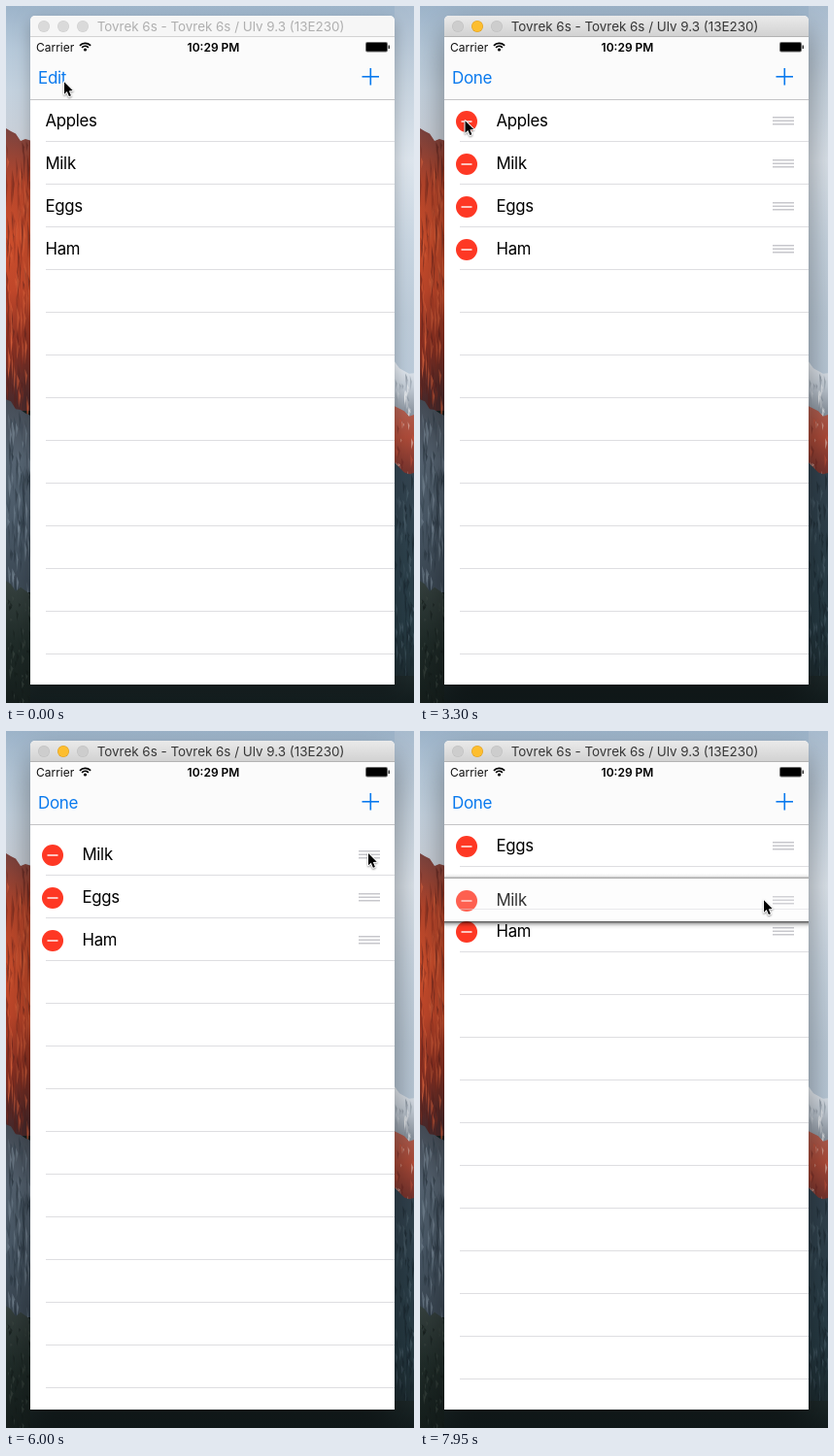
Write an HTML page with a canvas that moves like this. It is 420 by 718 pixels and loops after 8 s.

```html
<!DOCTYPE html>
<html lang="en">
<head>
<meta charset="utf-8">
<title>Editable list</title>
<style>
html, body { margin: 0; width: 100%; height: 100%; overflow: hidden; background: #16211f; }
canvas { display: block; width: 420px; height: 718px; }
</style>
</head>
<body>
<canvas id="stage" width="420" height="718"></canvas>
<script>
const LOOP = 8000, TICK = 150;
const W = 420, H = 718;
const LEFT = 25, RIGHT = 400, TOP = 10, BOTTOM = 699, WIDE = RIGHT - LEFT;
const LIST = 96, ROW = 44, DELETE = 82;
const FONT = 'Inter, "Liberation Sans", sans-serif';
const BLUE = '#0a7aee', RED = '#fe3824', LINE = '#dedee1', GRIP = '#c7c7cc';
const ctx = document.getElementById('stage').getContext('2d');

// Progress of a move whose first visible step falls on `from` and last on `to`.
function linear(t, from, to) {
  return Math.min(1, Math.max(0, (t - from + TICK) / (to - from + TICK)));
}

function ease(t, from, to) {
  const p = linear(t, from, to);
  return p * p * (3 - 2 * p);
}

// Pointer moves: from, to, x, y
const MOVES = [
  [300, 600, 48, 78.5],
  [1200, 1350, 124, 120],
  [1950, 1950, 66.5, 120.5],
  [2100, 2100, 47, 118],
  [2400, 2700, 112, 118],
  [2850, 3300, 46, 117.5],
  [3900, 4500, 361.5, 118.5],
  [4950, 5700, 368.5, 117.5],
  [5850, 6000, 372.5, 117.5],
  [7350, 7950, 353.5, 117.5]
];

function poseAt(t) {
  const pose = {
    active: t >= 1050,
    edit: ease(t, 1200, 1350),
    swipe: DELETE * ease(t, 3600, 3900),
    gone: ease(t, 4650, 4950),
    scroll: Math.round(9 * (ease(t, 5850, 6000) - ease(t, 6300, 7050))),
    drag: 56 * linear(t, 7350, 7950),
    swap: ease(t, 7500, 7800),
    x: 59.5, y: 77.5
  };
  for (const [from, to, x, y] of MOVES) {
    const p = ease(t, from, to);
    pose.x += (x - pose.x) * p;
    pose.y += (y - pose.y) * p;
  }
  pose.y += pose.scroll * 0.85 + pose.drag;
  return pose;
}

function rect(x, y, w, h, fill) {
  ctx.fillStyle = fill;
  ctx.fillRect(x, y, w, h);
}

function disc(x, y, r, fill) {
  ctx.fillStyle = fill;
  ctx.beginPath();
  ctx.arc(x, y, r, 0, Math.PI * 2);
  ctx.fill();
}

function round(x, y, w, h, radii, fill) {
  ctx.beginPath();
  ctx.roundRect(x, y, w, h, radii);
  ctx.fillStyle = fill;
  ctx.fill();
}

function poly(points, fill) {
  ctx.beginPath();
  points.forEach(([x, y]) => ctx.lineTo(x, y));
  ctx.closePath();
  ctx.fillStyle = fill;
  ctx.fill();
}

function label(text, x, y, size, color, opt = {}) {
  ctx.font = `${opt.weight || 400} ${size}px ${FONT}`;
  ctx.letterSpacing = (opt.track || 0) + 'px';
  ctx.textAlign = opt.align || 'left';
  ctx.fillStyle = color;
  ctx.fillText(text, x, y);
}

function fade(y0, y1, ...stops) {
  const g = ctx.createLinearGradient(0, y0, 0, y1);
  stops.forEach((c, i) => g.addColorStop(i / (stops.length - 1), c));
  return g;
}

function random(seed) {
  return () => (seed = (seed * 16807) % 2147483647) / 2147483647;
}

// A strip of landscape with a ragged top and seeded vertical flecks.
function layer(x, y0, y1, colors, flecks, length) {
  const rnd = random(y0 * 7 + x + 1);
  const ridge = [[x + 25, y1 + 12], [x, y1 + 12]];
  for (let i = 0; i <= 25; i += 5) ridge.push([x + i, y0 + i * 0.4 + rnd() * 7]);
  poly(ridge, fade(y0, y1, ...colors));
  ctx.globalAlpha = 0.5;
  for (let i = 0; i < (y1 - y0) * 0.5; i++) {
    const fx = x + rnd() * 25, fy = y0 + 12 + rnd() * (y1 - y0 - 8), len = length * (0.3 + rnd());
    poly([[fx, fy], [fx + 1 + rnd() * 2, fy + len * 0.4], [fx + rnd(), fy + len]], flecks[i % flecks.length]);
  }
  ctx.globalAlpha = 1;
}

function drawBackdrop() {
  rect(0, 0, W, H, '#16211f');
  rect(0, 0, 400, 140, fade(0, 130, '#9db4ca', '#b5c8d9', '#c3d1de', '#c9d0d9'));
  rect(400, 0, 20, 400, fade(0, 400, '#a9bccf', '#c6d3df', '#dde5ed', '#c9d6e2', '#bccbd9', '#b9c9d8'));

  layer(0, 126, 405, ['#7a4440', '#b5452b', '#cb4e2c', '#c0472a', '#8a3022', '#4e2a2b'], ['#57201c', '#e8693f', '#8a2f20'], 32);
  layer(0, 405, 592, ['#454c56', '#566472', '#4a5967', '#3c4955'], ['#222d38', '#8493a1', '#33414e'], 26);
  layer(0, 592, H, ['#36413f', '#1f2b28', '#141d1b'], ['#121a18', '#3f4b45'], 9);

  layer(400, 366, 418, ['#edf2f7', '#c3ccd6', '#8d96a1'], ['#ffffff', '#7c8793'], 14);
  layer(400, 412, 478, ['#b06052', '#ab4a38', '#7a352e'], ['#efd9d0', '#6a2521', '#c9543c'], 12);
  layer(400, 470, H, ['#33434f', '#2d404b', '#263a43', '#182427'], ['#15222a', '#4c606c'], 18);
  rect(LEFT, 690, W - LEFT, 28, fade(690, H, '#1c2728', '#121c1d'));
}

function drawFrame(active) {
  ctx.save();
  ctx.shadowColor = active ? 'rgba(0,0,0,.42)' : 'rgba(0,0,0,.26)';
  ctx.shadowBlur = active ? 34 : 16;
  ctx.shadowOffsetY = active ? 16 : 6;
  round(LEFT, TOP, WIDE, BOTTOM - TOP, [5, 5, 0, 0], '#fff');
  ctx.restore();

  round(LEFT, TOP, WIDE, 22, [5, 5, 0, 0], active ? fade(10, 32, '#eaeaea', '#d1d1d1') : '#f6f6f6');
  rect(LEFT, 31, WIDE, 1, active ? '#b3b3b3' : '#d3d3d3');
  for (let i = 0; i < 3; i++) {
    const lit = active && i === 1, x = 39 + 20 * i;
    disc(x, 21, 6, lit ? '#dfa023' : active ? '#c0c0c0' : '#cfcfcf');
    disc(x, 21, 5.4, lit ? '#fdbe2f' : active ? '#cdcdcd' : '#dadada');
  }
  label('Tovrek 6s - Tovrek 6s / Ulv 9.3 (13E230)', 221, 25.7, 13.4, active ? '#363636' : '#afafaf', { align: 'center' });
}

function drawBars(editing) {
  rect(LEFT, 32, WIDE, 64, '#fbfbfb');
  rect(LEFT, 96, WIDE, 1, '#c4c4c6');
  label('Carrier', 31, 46.5, 12, '#111');
  label('10:29 PM', 213.5, 46.5, 12, '#000', { weight: 600, align: 'center' });

  ctx.strokeStyle = '#000';
  ctx.lineWidth = 1.7;
  for (const r of [4.6, 7.6]) {
    ctx.beginPath();
    ctx.arc(81.5, 46, r, -Math.PI * 0.76, -Math.PI * 0.24);
    ctx.stroke();
  }
  disc(81.5, 45, 1.6, '#000');

  round(370, 37, 23, 10.5, 2, '#6a6a6a');
  round(371, 38, 21, 8.5, 1, '#000');
  rect(393.5, 40.5, 1.5, 3.5, '#333');

  label(editing ? 'Done' : 'Edit', 33, 80, 17, BLUE, { track: -0.3 });
  rect(366.5, 72, 17.5, 1.6, BLUE);
  rect(374.5, 64, 1.6, 17.5, BLUE);
}

function separator(y, x = 41) {
  rect(x, y + ROW - 1, RIGHT - x, 1, LINE);
}

function drawCell(name, y, edit, dx = 0) {
  label(name, 40.5 + 38 * edit + dx, y + 28, 16.8, '#000', { track: -0.3 });
  if (!edit) return;
  const x = 48 - 38 * (1 - edit) + dx, alpha = ctx.globalAlpha;
  disc(x, y + 23, 11, RED);
  rect(x - 5.5, y + 22.3, 11, 1.4, '#fff');
  ctx.globalAlpha = alpha * edit;
  for (let i = 0; i < 3; i++) rect(363 + dx, y + 18 + i * 3.5, 22, 1.5, GRIP);
  ctx.globalAlpha = alpha;
}

function drawRow(name, y, edit) {
  rect(LEFT, y + 1, WIDE, ROW - 1, '#fff');
  drawCell(name, y, edit);
  separator(y);
}

function drawSwiped({ swipe, gone, edit }) {
  ctx.globalAlpha = 1 - gone;
  drawCell('Apples', LIST, edit, -swipe);
  separator(LIST, Math.max(LEFT, 41 - swipe));
  rect(RIGHT - swipe, LIST, swipe, ROW, RED);
  if (swipe) label('Delete', RIGHT - swipe + 14.5, LIST + 28, 17, '#fff', { track: -0.2 });
  ctx.globalAlpha = 1;
}

function drawLifted(name, y) {
  const end = y + ROW;
  rect(LEFT, y - 5, WIDE, 5, fade(y - 5, y, 'rgba(0,0,0,0)', 'rgba(0,0,0,.07)', 'rgba(0,0,0,.4)'));
  rect(LEFT, end, WIDE, 8, fade(end, end + 8, 'rgba(0,0,0,.7)', 'rgba(0,0,0,.25)', 'rgba(0,0,0,.06)', 'rgba(0,0,0,0)'));
  ctx.globalAlpha = 0.8;
  rect(LEFT, y, WIDE, ROW, '#fdfdfd');
  drawCell(name, y, 1);
  ctx.globalAlpha = 0.5;
  separator(LIST + ROW);
  ctx.globalAlpha = 1;
}

function drawList(pose) {
  const { edit, gone, scroll, drag, swap } = pose;
  const place = i => LIST + scroll + i * ROW;

  ctx.save();
  ctx.beginPath();
  ctx.rect(LEFT, LIST, WIDE, BOTTOM - LIST);
  ctx.clip();
  for (let i = drag ? 1 : 3; i < 13; i++) separator(place(i));
  if (gone < 1) drawSwiped(pose);
  if (!drag) drawRow('Milk', place(1 - gone), edit);
  drawRow('Eggs', place(2 - gone - swap), edit);
  drawRow('Ham', place(3 - gone), edit);
  if (drag) drawLifted('Milk', LIST + drag);
  ctx.restore();
}

function drawCursor(x, y) {
  ctx.save();
  ctx.translate(x, y);
  ctx.shadowColor = 'rgba(0,0,0,.35)';
  ctx.shadowBlur = 2;
  ctx.shadowOffsetY = 1;
  ctx.lineJoin = 'round';
  ctx.lineWidth = 2;
  ctx.strokeStyle = '#fff';
  const arrow = [[0.5, 0.8], [0.5, 13.2], [3.3, 10.6], [5.4, 15.6], [7.4, 14.8], [5.3, 9.9], [9.2, 9.6]];
  poly(arrow, '#000');
  ctx.stroke();
  ctx.shadowColor = 'transparent';
  poly(arrow, '#000');
  ctx.restore();
}

function draw(time) {
  const pose = poseAt(Math.floor((time % LOOP) / TICK) * TICK);
  drawBackdrop();
  drawFrame(pose.active);
  drawBars(pose.edit > 0);
  drawList(pose);
  drawCursor(pose.x, pose.y);
}

const start = performance.now();
function tick() {
  draw(performance.now() - start);
  requestAnimationFrame(tick);
}
tick();
</script>
</body>
</html>
```
